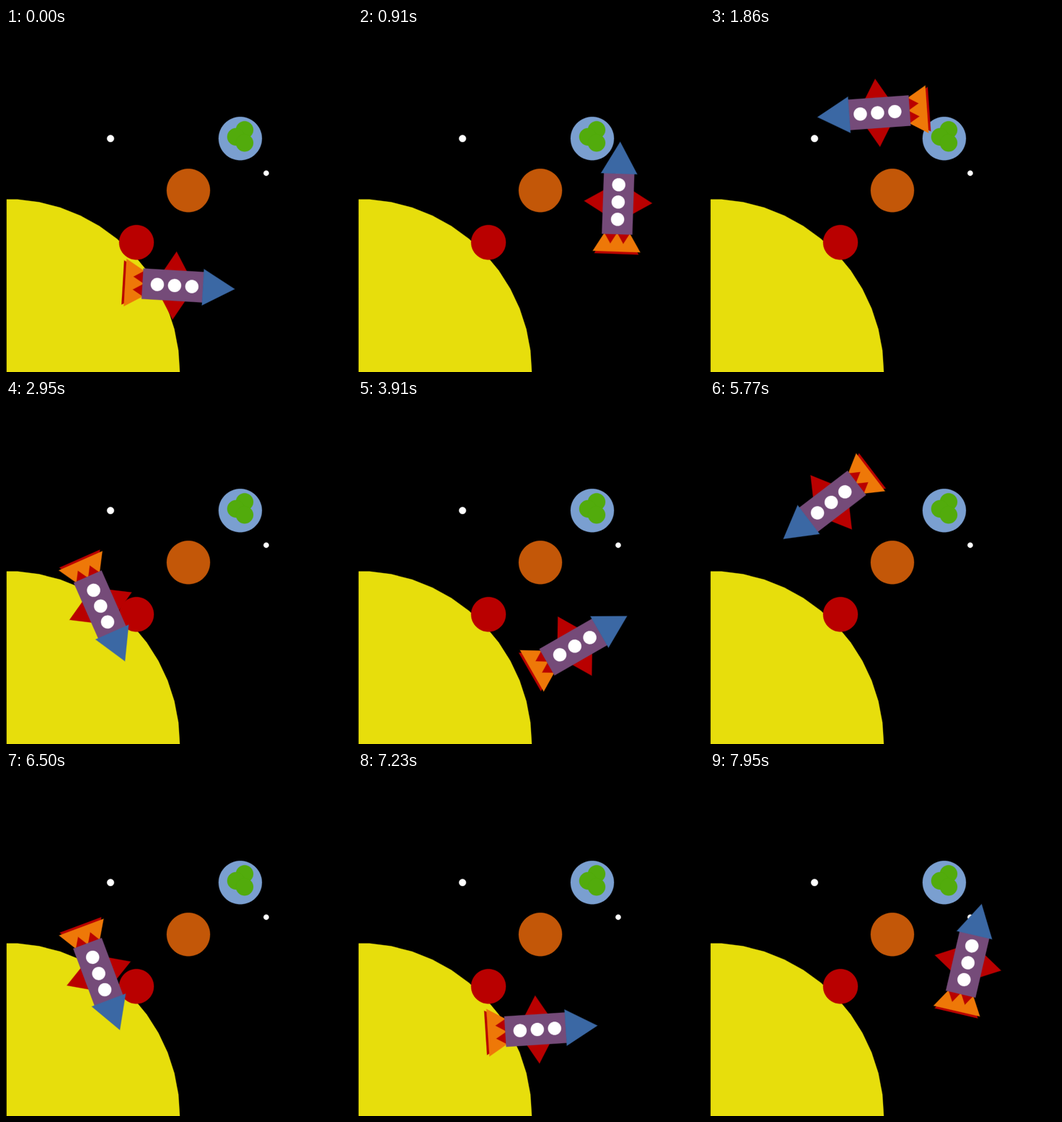
Write an HTML page that moves like this. It is 480 px wide and 477 px high and loops after 8000 ms.

```html
<!DOCTYPE html>
<html lang="en">
<head>
<meta charset="utf-8">
<title>Rocket orbit</title>
<style>
html, body { margin: 0; width: 100%; height: 100%; overflow: hidden; background: #000; }
svg { display: block; width: 100%; height: 100%; }
polygon { stroke-opacity: .4; }
</style>
</head>
<body>
<svg viewBox="0 0 480 477">
  <g id="space"></g>
  <g id="rocket"></g>
</svg>
<script>
const LOOP = 8000, FPS = 22;
const U = 24;                     // grid unit in pixels
const CX = 241, CY = 237.3;       // centre of the grid and of the orbit
const ORBIT = 5 * U;
const FIRST = -3.4, TURN = 4.573; // heading at the start and turn per step, degrees
const RED = '#b90000', ORANGE = '#ee7808', PURPLE = '#754b79', BLUE = '#3b68a4';

const space = document.getElementById('space');
const rocket = document.getElementById('rocket');

function poly(parent, fill, points) {
  const el = document.createElementNS('http://www.w3.org/2000/svg', 'polygon');
  el.setAttribute('fill', fill);
  el.setAttribute('stroke', fill);
  el.setAttribute('points', points.map(p => p.join(',')).join(' '));
  parent.append(el);
}

// Discs are regular polygons with 50 sides
function disc(parent, fill, x, y, r, minX = -Infinity) {
  const points = Array.from({ length: 50 }, (_, i) => {
    const a = i * Math.PI / 25;
    return [Math.max(minX, x + r * Math.cos(a)), y + r * Math.sin(a)];
  });
  poly(parent, fill, points);
}

// Places a disc in grid units around the centre
const body = (fill, x, y, r, minX) => disc(space, fill, CX + x * U, CY + y * U, r * U, minX);

// Upright trapezoid, symmetric about the rocket's axis
const taper = (fill, x0, h0, x1, h1) =>
  poly(rocket, fill, [[x0, -h0], [x1, -h1], [x1, h1], [x0, h0]]);

function buildSpace() {
  body('#e7de0c', -10, 10, 10, 1);
  body(RED, -2.5, 2.5, 1);
  body('#c35708', 0.5, -0.5, 1.25);
  body('#7a9fd0', 3.5, -3.5, 1.25);
  body('#52ab0c', 3.75, -4, 0.5);
  body('#52ab0c', 3.25, -3.6, 0.5);
  body('#52ab0c', 3.75, -3.25, 0.5);
  body('#fff', -4, -3.5, 0.2);
  body('#fff', 5, -1.5, 0.15);
}

// Nose points along +x, middle window at the origin
function buildRocket() {
  poly(rocket, RED, [[0, -47], [28, 0], [0, 47], [-28, 0]]);
  taper(RED, -44, 16, -71.8, 30.5);
  taper(ORANGE, -44, 18, -68.6, 32.8);
  for (const s of [-1, 1]) poly(rocket, RED, [[-44, 17 * s], [-57.3, 9 * s], [-44, s]]);
  taper(PURPLE, -44.5, 21, 40, 21);
  taper(BLUE, 39.5, 25, 83.4, 0);
  for (const x of [-U, 0, U]) disc(rocket, '#fff', x, 0, 9);
}

// Steps begin on whole hundredths of a second
const stepTime = n => Math.round(n * 100 / FPS) * 10;

function draw(ms) {
  const t = ms % LOOP;
  let n = Math.floor(t * FPS / 1000) + 1;
  while (stepTime(n) > t) n--;
  const heading = FIRST + TURN * n;
  rocket.setAttribute('transform', `translate(${CX} ${CY}) rotate(${-heading}) translate(0 ${ORBIT})`);
}

buildSpace();
buildRocket();
draw(0);

let start;
function tick(now) {
  start ??= now;
  draw(Math.max(0, now - start));
  requestAnimationFrame(tick);
}
requestAnimationFrame(tick);
</script>
</body>
</html>
```
